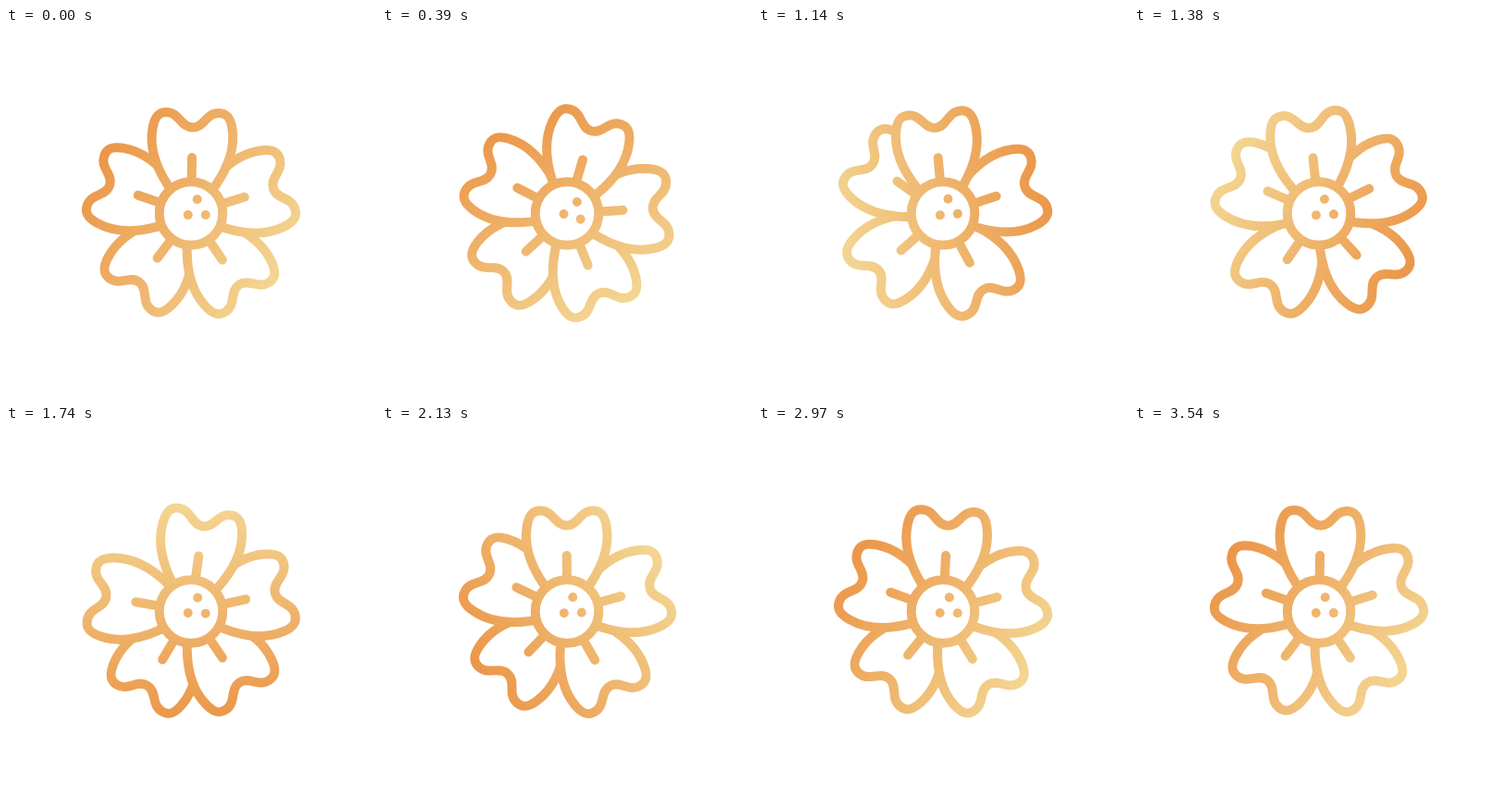
Animation of 400x400 px, one loop 5570 ms. Source, as an HTML page with a canvas:

```html
<!DOCTYPE html>
<html lang="en">
<head>
<meta charset="utf-8">
<title>Flower</title>
<style>
html, body { margin: 0; width: 100%; height: 100%; overflow: hidden; background: #fff; }
canvas { display: block; width: 100vmin; height: 100vmin; margin: auto; }
</style>
</head>
<body>
<canvas id="stage"></canvas>
<script>
const LOOP = 5570, STEP = 30, SIZE = 400;
const CX = 200, CY = 200.5, TAU = Math.PI * 2;
const DARK = '#eb974a', LIGHT = '#f3d592';

const canvas = document.getElementById('stage');
const ctx = canvas.getContext('2d');
const scale = window.devicePixelRatio || 1;
canvas.width = canvas.height = SIZE * scale;

const petal = new Path2D(
  'M-15-15L-25.5-30C-37-47-47-68-43-92C-41-104-37-109-28.5-109' +
  'C-14-109-13-93 0-93C13-93 14-109 28.5-109' +
  'C37-109 41-104 43-92C47-68 37-47 25.5-30L15-15Z');
const stamen = new Path2D('M0-36V-60.5');
const ring = new Path2D();
ring.arc(CX, CY, 34.3, 0, TAU);
const dots = new Path2D();
for (const [x, y] of [[6.7, -15.2], [-3.2, 1.6], [15.8, 1.6]]) {
  dots.moveTo(x + 5, y);
  dots.arc(x, y, 5, 0, TAU);
}

const smooth = u => u * u * (3 - 2 * u);
const easeOut = u => Math.sin(u * Math.PI / 2);

// Swing through [time, angle] keys; the first push starts fast.
function swing(keys, t) {
  if (t <= keys[0][0]) return 0;
  for (let k = 1; k < keys.length; k++) {
    const [t0, a0] = keys[k - 1], [t1, a1] = keys[k];
    if (t < t1) {
      const u = (t - t0) / (t1 - t0);
      return a0 + (a1 - a0) * (k === 1 ? easeOut(u) : smooth(u));
    }
  }
  return 0;
}

// Each petal, clockwise from the top, lags behind the one before.
const petalKeys = i => [
  [45 * i, 0],
  [700 + 62 * i, 20],
  [1260 + 75 * i + 14 * i * i, -9.5],
  [1770 + 100 * i, 7],
  [2330 + 65 * i, -4.6],
  [2860 + 60 * i, 2.2],
  [3340 + 50 * i, 0]
];
const rest = [1, 73, 146, 217, 289];
const swings = rest.map((_, i) => petalKeys(i));
const dotKeys = [[0, 0], [500, 18], [1200, -5], [1700, 2], [2200, -2], [2700, 1], [3300, 0]];
const stacking = [3, 2, 1, 4, 0];

function place(path, deg) {
  const out = new Path2D();
  out.addPath(path, new DOMMatrix().translate(CX, CY).rotate(deg));
  return out;
}

function paint(t) {
  const u = Math.min(1, t / 2850);
  const a = (303 + 360 * (0.25 * u + 0.75 * smooth(u))) * Math.PI / 180;
  const gx = Math.sin(a) * 114, gy = -Math.cos(a) * 114;
  const ink = ctx.createLinearGradient(CX + gx, CY + gy, CX - gx, CY - gy);
  ink.addColorStop(0, DARK);
  ink.addColorStop(1, LIGHT);

  ctx.setTransform(scale, 0, 0, scale, 0, 0);
  ctx.fillStyle = '#fff';
  ctx.fillRect(0, 0, SIZE, SIZE);
  ctx.strokeStyle = ink;
  ctx.lineWidth = 10;
  ctx.lineCap = ctx.lineJoin = 'round';

  for (const i of stacking) {
    const deg = rest[i] + swing(swings[i], t);
    const shape = place(petal, deg);
    ctx.fill(shape);
    ctx.stroke(shape);
    ctx.stroke(place(stamen, deg));
  }
  ctx.fill(ring);
  ctx.stroke(ring);
  ctx.fillStyle = ink;
  ctx.fill(place(dots, swing(dotKeys, t)));
}

const start = performance.now();
function tick() {
  const t = (performance.now() - start) % LOOP;
  paint(Math.floor(t / STEP) * STEP);
  requestAnimationFrame(tick);
}
tick();
</script>
</body>
</html>
```
